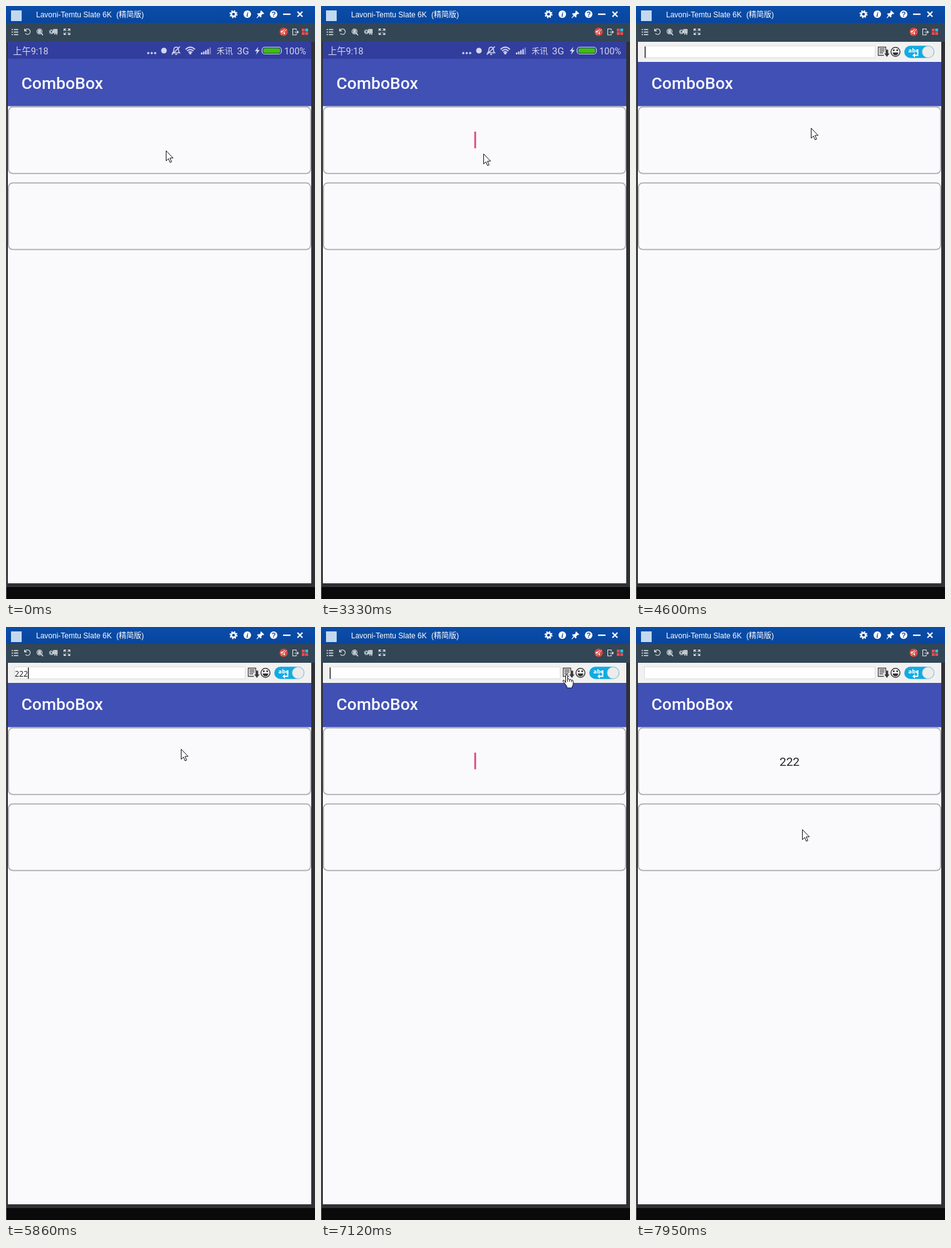
Animation, 493 px wide and 944 px high, one loop 8000 ms. Source, as an HTML page:

```html
<!DOCTYPE html>
<html lang="zh-CN">
<head>
<meta charset="utf-8">
<title>ComboBox</title>
<style>
html, body { margin: 0; width: 100%; height: 100%; overflow: hidden; background: #0a0a0b; }
svg { display: block; }
text { white-space: pre; }
.ui { font-family: "Liberation Sans", "Noto Sans CJK SC", "Noto Sans CJK", sans-serif; font-size: 12px; fill: #fff; }
.app { font-family: Roboto, "Noto Sans CJK SC", "Noto Sans CJK", sans-serif; }
.status { font-size: 14.4px; fill: #d3d6ec; }
.field { fill: #fafafc; stroke: #acacae; stroke-width: 1.7; }
.line { fill: none; stroke: #e4e8eb; stroke-width: 1.1; }

/* 1% of the loop is 80 ms */
.blink, .caret-pos, .bar, .typing, .bar-caret, .entry, .arrow, .hand {
  animation: 8s step-end infinite;
}
.blink { animation-name: blink; }
.caret-pos { animation-name: caret-pos; }
.bar { animation-name: bar; }
.typing { animation-name: typing; }
.bar-caret { animation-name: bar-caret; }
.entry { animation-name: entry; }
.arrow { animation-name: arrow; }
.hand { animation-name: hand; }
.pointer { animation: pointer 8s linear infinite; }

@keyframes blink {
  0%, 8.25%, 20.625%, 33.125%, 45.625%, 57.5%, 70%, 82.5%, 95.625%, 100% { opacity: 0; }
  2.25%, 14.5%, 26.875%, 39.125%, 51.875%, 63.75%, 76.25%, 88.75% { opacity: 1; }
}
@keyframes caret-pos {
  0% { transform: none; }
  89.5%, 100% { transform: translateX(17px); }
}
@keyframes bar {
  0% { opacity: 0; }
  56.875%, 100% { opacity: 1; }
}
@keyframes typing {
  0%, 88%, 100% { transform: translateX(0); }
  66.75% { transform: translateX(7px); }
  69.875% { transform: translateX(14px); }
  73.25% { transform: translateX(21px); }
}
@keyframes bar-caret {
  0%, 63%, 79.875%, 94.5%, 100% { opacity: 0; }
  57%, 66.75%, 88% { opacity: 1; }
}
@keyframes entry {
  0% { opacity: 0; }
  89.5%, 100% { opacity: 1; }
}
@keyframes arrow {
  0%, 90.75%, 100% { opacity: 1; }
  81% { opacity: 0; }
}
@keyframes hand {
  0%, 90.75%, 100% { opacity: 0; }
  81% { opacity: 1; }
}
@keyframes pointer {
  0%, 1.8% { transform: translate(255px, 230px); }
  2.5%, 33% { transform: translate(262px, 235px); }
  33.125%, 38.5% { transform: translate(263px, 235px); }
  39.625%, 41.5% { transform: translate(260px, 235px); }
  41.625%, 44.5% { transform: translate(259px, 235px); }
  46.625%, 48.75% { transform: translate(291px, 176px); }
  52.25% { transform: translate(279px, 194px); }
  75.75% { transform: translate(279px, 194px); animation-timing-function: ease-in-out; }
  82% { transform: translate(408px, 78px); animation-timing-function: ease-in-out; }
  85.125%, 87.4% { transform: translate(395px, 75px); }
  89% { transform: translate(392px, 76px); }
  90% { transform: translate(392px, 76px); animation-timing-function: ease-in-out; }
  96.875% { transform: translate(266px, 318px); }
  97.5%, 98.5% { transform: translate(267px, 321px); }
  99.375%, 100% { transform: translate(265px, 322px); }
}
</style>
</head>
<body>
<svg width="493" height="944" viewBox="0 0 493 944">
  <defs>
    <linearGradient id="title" x2="0" y2="1">
      <stop offset="0" stop-color="#0a4da8"/>
      <stop offset="1" stop-color="#08469f"/>
    </linearGradient>
    <g id="gear">
      <circle r="3.5" fill="none" stroke="#fff" stroke-width="2.6"/>
      <circle r="5.4" fill="none" stroke="#fff" stroke-width="2" stroke-dasharray="2.1 2.14"/>
    </g>
  </defs>

  <!-- window frame -->
  <rect width="493" height="944" fill="#303135"/>
  <rect y="925" width="493" height="19" fill="#0a0a0b"/>
  <rect y="57" width="1" height="887" fill="#55575a"/>
  <rect width="493" height="28" fill="url(#title)"/>
  <rect y="27" width="493" height="30" fill="#334656"/>

  <!-- title bar -->
  <rect x="8" y="7" width="17" height="17" fill="#c3d8ef"/>
  <g class="ui">
    <text x="48" y="18">Lavoni-Temtu Slate 6K</text>
    <text x="176" y="18">(精简版)</text>
  </g>
  <use href="#gear" x="363" y="13"/>
  <g fill="#fff">
    <circle cx="385" cy="13" r="6"/>
    <circle cx="427" cy="13" r="6"/>
    <path d="M407 7l5 5-1.5 1-1.2-.4-2 2.2.3 2.4-1.3 1-2.3-2.2-3.6 3.6-.8-.6 3.2-4-2.2-2.3 1.2-1.2 2.4.2 2.2-2-.5-1.4z"/>
    <rect x="442" y="12" width="12" height="2.2"/>
  </g>
  <path d="M465 9l8 8m0-8l-8 8" stroke="#fff" stroke-width="2.2"/>
  <g font-family="Liberation Serif, serif" font-weight="bold" text-anchor="middle" fill="#0a4aa3">
    <text x="385" y="17" font-size="11" font-style="italic">i</text>
    <text x="427" y="17" font-size="11" font-family="Liberation Sans, sans-serif">?</text>
  </g>

  <!-- toolbar -->
  <g class="line">
    <path d="M9 37.5h2m1.5 0h7M9 41.5h2m1.5 0h7M9 45.5h2m1.5 0h7" stroke-width="1.4"/>
    <path d="M30.3 39a4.4 4.4 0 1 1 .6 4.7M29.6 36v3.6h3.6"/>
    <circle cx="53.5" cy="40.5" r="4"/>
    <path d="M52 38.5h3v4h-3zM52 40.5h3M56.5 43.5l2.5 3" stroke-width="1.4"/>
    <circle cx="72.5" cy="41" r="2"/>
    <circle cx="72.5" cy="41" r="3.3" stroke-dasharray="1.4 1.2"/>
    <path d="M76 37.5h5.5v5H76zM76 40h5.5M78.8 37.5v5M81 42.5v3.5M77 44.5h2" stroke-width="1.3"/>
    <path d="M92.5 40v-3.500h3.500M98.500 36.500h3.500V40M102 42.500v3h-3.500M96 45.500h-3.500v-3M93 37l3 2.700M101.500 37l-3 2.700M93 45l3-2.700M101.500 45l-3-2.700"/>
    <path d="M463 39v-2.500h-5.500v9.500h5.500v-2.500M460.500 41.500h6M464.500 39.500l2 2-2 2"/>
  </g>
  <circle cx="443" cy="41" r="6.6" fill="#d9473f"/>
  <path d="M438.500 39.500h2.500l4-3v9l-4-3h-2.500z" fill="#fff"/>
  <path d="M447.500 36.500l-8.500 9" stroke="#d9473f" stroke-width="2.600"/>
  <path d="M448 37l-9 8.500" stroke="#f6dedc"/>
  <path d="M472 36h4.500v4.500H472zM472 41.500h4.500V46H472zM477.500 41.500h4.500V46h-4.500z" fill="#f04a4f"/>
  <path d="M477.500 36h4.500v4.500h-4.500z" fill="#22c3e6"/>

  <!-- phone screen -->
  <rect x="3" y="57" width="484" height="862" fill="#fafafc"/>
  <rect x="3" y="57" width="484" height="27" fill="#323e9e"/>
  <rect x="3" y="84" width="484" height="75.500" fill="#4050b5"/>
  <g class="app status">
    <text x="11" y="76.500">上午9:18</text>
    <text x="336" y="76" font-size="13">禾讯</text>
    <text x="368.500" y="76.500" font-size="15.500">3G</text>
    <text x="444" y="76.500">100%</text>
  </g>
  <g fill="#d3d6ec">
    <circle cx="227" cy="75" r="1.800"/>
    <circle cx="232.500" cy="75" r="1.800"/>
    <circle cx="238" cy="75" r="1.800"/>
    <circle cx="252" cy="71" r="4.500"/>
    <path d="M311 74h2.300v3H311zM314.400 72.500h2.300V77h-2.300zM317.800 70.500h2.300V77h-2.300zM321.200 68.500h2.300V77h-2.300z"/>
    <path d="M324.600 66h2.300v11h-2.300z" opacity=".45"/>
    <path d="M402.500 65l-5.500 7h3.300l-1.300 5.500 5.800-7.500h-3.500z"/>
    <circle cx="294" cy="75.500" r="1.800"/>
  </g>
  <g fill="none" stroke="#d3d6ec" stroke-width="1.500">
    <path d="M266 74.500h11q-1.800-1.500-1.800-4.500c0-6-7.400-6-7.400 0q0 3-1.800 4.500zM270 76.500q1.500 1.500 3 0M277.500 64.500l-13 13"/>
    <path d="M286.500 69q7.500-7 15 0M288.800 71.500q5.200-4.600 10.400 0M291 74q3-2.600 6 0" stroke-width="1.800"/>
    <rect x="408.500" y="65.500" width="31" height="11" rx="4.500" stroke-width="1.200"/>
  </g>
  <rect x="410.500" y="67.300" width="27" height="7.500" rx="3" fill="#43bd0a"/>
  <text class="app" x="24.500" y="132" font-size="26.500" font-weight="500" fill="#f7f7fb">ComboBox</text>

  <rect class="field" x="3.900" y="160.700" width="482.200" height="106" rx="7"/>
  <rect class="field" x="3.900" y="281.700" width="482.200" height="106" rx="7"/>
  <text class="app entry" x="245" y="220.500" font-size="19" text-anchor="middle" fill="#252527">222</text>
  <g class="caret-pos">
    <rect class="blink" x="244.600" y="200" width="2.800" height="26.500" fill="#e2447c"/>
  </g>

  <!-- text entry bar -->
  <g class="bar">
    <rect x="3" y="57" width="484" height="32" fill="#f1f1f1"/>
    <rect x="13.500" y="63.500" width="368" height="19" fill="#fff" stroke="#dcdcdc"/>
    <text x="14" y="79" font-family="Open Sans, Noto Sans, sans-serif" font-size="12.240" fill="#111">222</text>
    <g class="typing">
      <rect x="14" y="65" width="23" height="17" fill="#fff"/>
      <rect class="bar-caret" x="14" y="64.500" width="1.200" height="18" fill="#000"/>
    </g>
    <path d="M398.500 70v-4.500h-12v13h9M388.500 68.500h8M388.500 71.500h8M388.500 74.500h6" fill="none" stroke="#444" stroke-width="1.300"/>
    <path d="M398.300 69.500h4v6h2.200l-4.200 5.500-4.200-5.500h2.200z" fill="#3b3b3b"/>
    <circle cx="414" cy="73" r="7.200" fill="#f4f4f4" stroke="#3d3d3d" stroke-width="1.500"/>
    <path d="M409.500 74h9q-.8 4.500-4.500 4.500t-4.500-4.500z" fill="#333"/>
    <circle cx="411.300" cy="70.500" r="1.400" fill="#333"/>
    <circle cx="416.700" cy="70.500" r="1.400" fill="#333"/>
    <rect x="428" y="63.300" width="48" height="19.400" rx="9.700" fill="#12abe2"/>
    <text x="434.500" y="74" font-family="DejaVu Sans, sans-serif" font-size="8.500" font-weight="bold" fill="#fff">abc</text>
    <path d="M449.500 69.500v9h-6" fill="none" stroke="#fff" stroke-width="1.800"/>
    <path d="M445 75v7l-4-3.500z" fill="#fff"/>
    <circle cx="466" cy="73" r="9.300" fill="#ececec" stroke="#b9c6cb" stroke-width=".8"/>
  </g>

  <!-- mouse pointer -->
  <g class="pointer" fill="#fff" stroke="#111" stroke-linejoin="round">
    <path class="arrow" d="M.5.5v16l3.700-3.500 2.500 6 2.500-1-2.600-6h5z"/>
    <g class="hand">
      <path d="M-1.500 12.500V1.500q0-1.500 1.500-1.500t1.500 1.500v5.500q2.300-1.200 3.200.7 2.300-.8 3 .8 2.600-.4 2.600 2v4q0 2.200-1.500 4v2.500h-8.500V18.500l-3.200-4.500-3-3.500q-.5-2.300 1.800-1.800z"/>
      <path d="M1.500 7v4M4.700 8v3M7.700 9v2.500" fill="none"/>
    </g>
  </g>
</svg>
</body>
</html>
```
